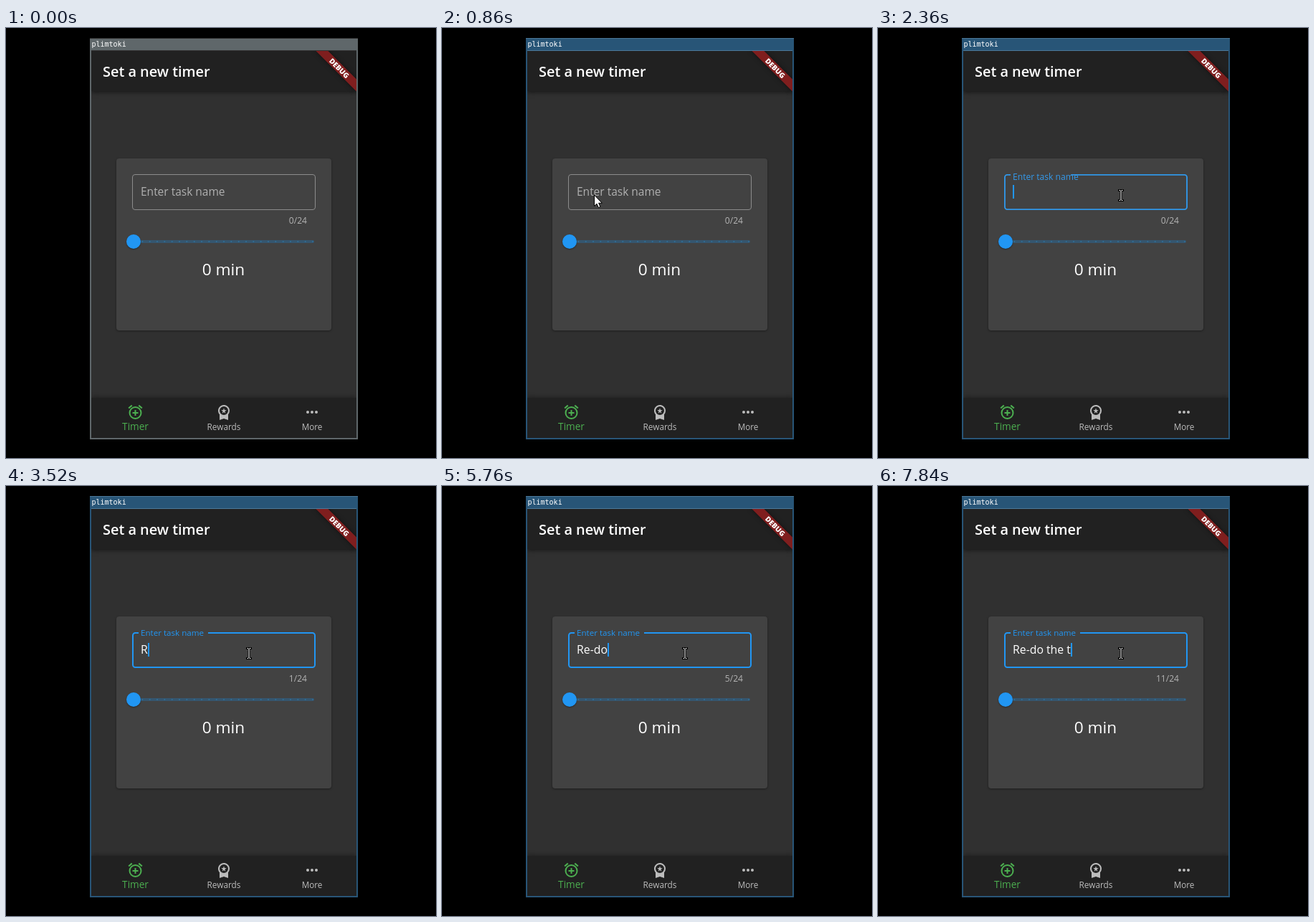
Animation of 600 by 600 pixels, one loop 8000 ms. Source, as an HTML page with a canvas:

```html
<!DOCTYPE html>
<html lang="en">
<head>
<meta charset="utf-8">
<style>
html, body { margin: 0; height: 100%; overflow: hidden; background: #000; }
canvas { display: block; }
</style>
</head>
<body>
<canvas id="stage" width="600" height="600"></canvas>
<script>
const c = document.getElementById('stage').getContext('2d');
const LOOP = 8000, BLUE = '#2196f3', GREEN = '#4caf50', SOFT = '#bcbcbc';
const SANS = '"Open Sans", sans-serif';

// [time, x, y] of the pointer hot spot
const pointer = [[820, 3, 226], [840, 108, 230], [860, 212, 233], [960, 252, 238], [1000, 290, 242],
  [1040, 318, 246], [1080, 335, 248], [1120, 342, 248], [1260, 342, 247], [1700, 339, 233]];
// [time, progress] of the field gaining focus
const focus = [[0, 0], [2220, .3], [2360, .87], [2500, .98], [2640, 1]];
const phrase = 'Re-do the t';
const keys = [3520, 4460, 5020, 5440, 5760, 6280, 6600, 6860, 7260, 7420, 7840];

const alarm = new Path2D('M7.88 3.39L6.6 1.86 2 5.71l1.29 1.53zM22 5.72l-4.6-3.86-1.29 1.53 4.6 3.86z' +
  'M12 4a9 9 0 1 0 0 18a9 9 0 1 0 0-18zm0 16a7 7 0 1 1 0-14a7 7 0 1 1 0 14zm1-11h-2v3H8v2h3v3h2v-3h3v-2h-3z');
const badge = new Path2D('M9.68 13.69L12 11.93l2.31 1.76-.88-2.85L15.75 9h-2.84L12 6.19 11.09 9H8.25l2.31 1.84z' +
  'M20 10a8 8 0 1 0-14 5.28V23l6-2 6 2v-7.72A8 8 0 0 0 20 10zm-8-6a6 6 0 1 1 0 12a6 6 0 1 1 0-12z');
const arrow = new Path2D('M.5 0V15.5L4 12.3L6.4 17.6L8.9 16.5L6.6 11.3H11.3Z');
const beam = new Path2D('M-2.5-6.5H-1L0-5.5L1-6.5H2.5M0-5.5V6.5M-2.5 7.5H-1L0 6.5L1 7.5H2.5');

const stepAt = (list, t) => list.filter(k => k[0] <= t).pop();
const mix = (a, b, p) => a + (b - a) * p;
const blend = (a, b, p) => `rgb(${a.map((v, i) => Math.round(mix(v, b[i], p)))})`;

function rect(x, y, w, h, color, r = 0) {
  c.fillStyle = color;
  c.beginPath();
  c.roundRect(x, y, w, h, r);
  c.fill();
}

function dot(x, y, r, color) {
  c.fillStyle = color;
  c.beginPath();
  c.arc(x, y, r, 0, 7);
  c.fill();
}

function text(s, x, y, size, color, align = 'left', weight = 400, family = SANS) {
  c.font = `${weight} ${size}px ${family}`;
  c.textAlign = align;
  c.fillStyle = color;
  c.fillText(s, x, y);
}

function shadowed(blur, dy, alpha, draw) {
  c.save();
  c.shadowColor = `rgba(0,0,0,${alpha})`;
  c.shadowBlur = blur;
  c.shadowOffsetY = dy;
  draw();
  c.restore();
}

function icon(path, x, y, color) {
  c.save();
  c.translate(x, y);
  c.fillStyle = color;
  c.fill(path, 'evenodd');
  c.restore();
}

function drawWindow(active) {
  rect(117, 14, 374, 560, active ? '#285577' : '#5f676a');
  c.fillStyle = active ? '#4c7899' : '#333';
  c.fillRect(117, 14, 374, 1);
  c.fillRect(119, 31, 370, 1);
  text('plimtoki', 119.5, 26, 10, '#fff', 'left', 400, '"DejaVu Sans Mono", monospace');
}

function drawBanner() {
  c.save();
  c.translate(489, 32);
  c.rotate(Math.PI / 4);
  shadowed(6, 0, .5, () => rect(-40, 28, 80, 12, '#7f1e1e'));
  text('DEBUG', 0, 37.7, 10, '#fff', 'center', 800);
  c.restore();
}

function drawBars() {
  shadowed(6, 2, .5, () => rect(119, 32, 370, 56, '#212121'));
  text('Set a new timer', 135, 68, 19.9, '#fff', 'left', 600);
  drawBanner();
  shadowed(6, -1, .35, () => rect(119, 516, 370, 56, '#212121'));
  icon(alarm, 168.5, 524, GREEN);
  icon(badge, 292, 524, SOFT);
  for (const x of [421, 427, 433]) dot(x, 536, 2, SOFT);
  text('Timer', 180.5, 560.5, 13.6, GREEN, 'center');
  text('Rewards', 304, 560.5, 11.8, SOFT, 'center');
  text('More', 427, 560.5, 11.7, SOFT, 'center');
}

function drawSlider() {
  rect(178, 296, 252, 4, '#35566f', 2);
  for (let i = 1; i <= 24; i++) dot(180 + i * 248 / 24, 298, 1, '#317098');
  shadowed(2, 1, .4, () => dot(178, 298, 10, BLUE));
  text('0 min', 303.5, 345, 22.6, '#fff', 'center');
}

function drawField(t, p, hover) {
  const w = 1 + p, l = 176 + w / 2, r = 432 - w / 2, top = 204 + w / 2, b = 254 - w / 2;
  const grey = hover ? 156 : 140, blue = [33, 150, 243];
  c.strokeStyle = blend([grey, grey, grey], blue, p);
  c.lineWidth = w;
  c.beginPath();
  c.moveTo(185 + 97 * p, top);
  c.arcTo(r, top, r, b, 3.5);
  c.arcTo(r, b, l, b, 3.5);
  c.arcTo(l, b, l, top, 3.5);
  c.arcTo(l, top, r, top, 3.5);
  c.lineTo(185, top);
  c.stroke();
  text('Enter task name', 188, mix(234, 209, p), 15.5 * (1 - p / 4), blend([176, 176, 176], blue, p));

  const count = keys.filter(k => k <= t).length;
  const typed = phrase.slice(0, count);
  text(typed, 188, 234, 15.8, '#fff');
  if (p > .5) {
    const end = 188 + c.measureText(typed).width;
    rect(Math.round(end), 219, 2, 19, BLUE);
  }
  text(count + '/24', 420, 273, 12.1, '#b3b3b3', 'right');
}

function drawPointer(t) {
  const at = stepAt(pointer, t);
  if (!at) return;
  const isBeam = t >= 960;
  c.save();
  c.translate(at[1], at[2]);
  if (isBeam) {
    c.lineWidth = 3;
    c.strokeStyle = '#000';
    c.lineCap = 'square';
    c.stroke(beam);
    c.lineWidth = 1;
    c.lineCap = 'butt';
    c.strokeStyle = '#fff';
    c.stroke(beam);
  } else {
    c.fillStyle = '#fff';
    c.strokeStyle = '#000';
    c.lineWidth = 1;
    c.fill(arrow);
    c.stroke(arrow);
  }
  c.restore();
}

function draw(t) {
  c.fillStyle = '#000';
  c.fillRect(0, 0, 600, 600);
  drawWindow(t >= 860);
  c.save();
  c.beginPath();
  c.rect(119, 32, 370, 540);
  c.clip();
  rect(119, 32, 370, 540, '#303030');
  drawBars();
  shadowed(3, 1, .4, () => rect(154, 182, 300, 240, '#424242', 4));
  drawField(t, stepAt(focus, t)[1], t >= 960);
  drawSlider();
  c.restore();
  drawPointer(t);
}

function tick() {
  draw(performance.now() % LOOP);
  requestAnimationFrame(tick);
}
tick();
</script>
</body>
</html>
```
